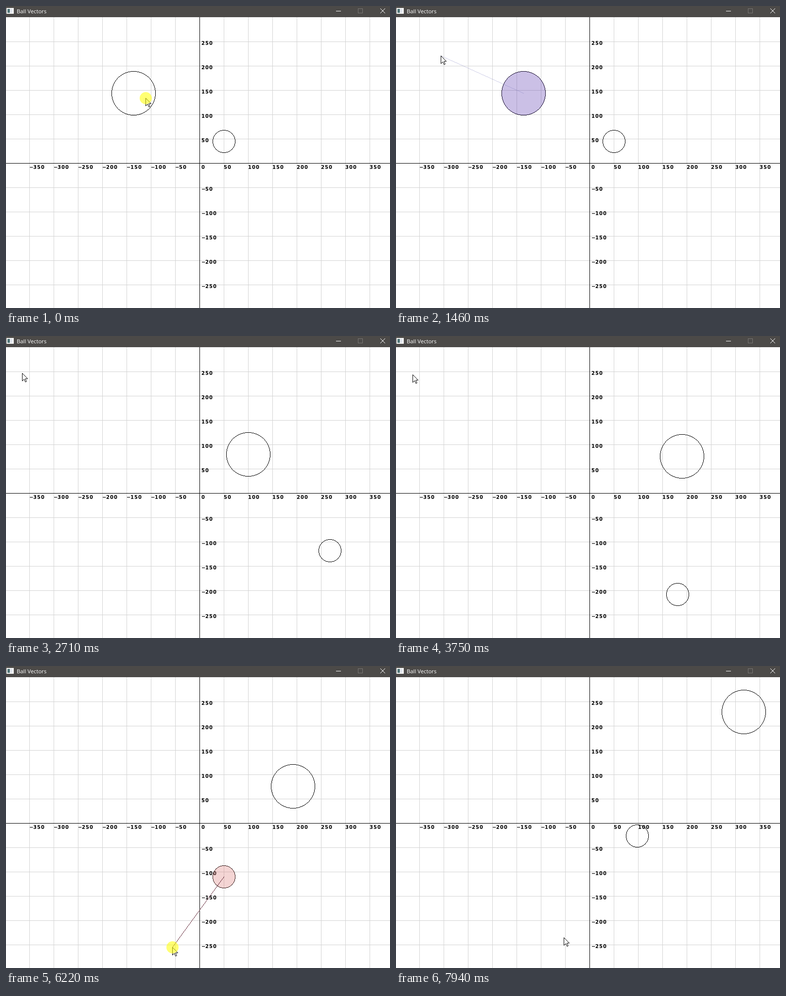
These frames come from a looping animation (790 by 621 pixels, 8000 ms). An HTML page with a canvas:

```html
<!DOCTYPE html>
<html lang="en">
<head>
<meta charset="utf-8">
<title>Ball Vectors</title>
<style>
  html, body { margin: 0; width: 100%; height: 100%; overflow: hidden; background: #fff; }
  canvas { display: block; }
</style>
</head>
<body>
<canvas id="stage" width="790" height="621"></canvas>
<script>
const W = 790, H = 621, BAR = 23, OX = 398, OY = 323, CELL = 50;
const LOOP = 8000, STEP = 69;
const BIG = 45, SMALL = 23, WALL = { x: 765, y: 592 };
const CLICK = 130, LAUNCH_DELAY = 140;
const ctx = document.getElementById('stage').getContext('2d');

const clamp = v => Math.min(1, Math.max(0, v));
const mix = (a, b, p) => a.map((v, i) => v + (b[i] - v) * p);
const progress = (t, from, to) => clamp((t - from) / (to - from));
const smooth = p => p * p * (3 - 2 * p);
const within = (t, from, length) => t >= from && t < from + length;
const fold = (v, limit) => v > limit ? 2 * limit - v : v;

// A shot is aimed between two clicks; the ball then rolls into the other one.
const shots = [
  { press: 0, release: 1800, impact: 2205 },
  { press: 5420, release: 6140, impact: 6620 }
];
for (const shot of shots) shot.launch = shot.release + LAUNCH_DELAY;
const [first, second] = shots;

// Share of the way covered under rolling friction plus drag.
function coast(t, start, stop) {
  const drag = 0.45;
  const left = s => (Math.exp(drag * s) - 1) / drag - s;
  const now = Math.min(stop, Math.max(start, t));
  return 1 - left((stop - now) / 1000) / left((stop - start) / 1000);
}

function bigBall(t) {
  const home = [262, 179], hit = [393, 239], rest = [590, 247], far = [725.6, 81];
  if (t < first.impact) return mix(home, hit, progress(t, first.launch, first.impact));
  if (t < second.impact) return mix(hit, rest, coast(t, first.impact, 3900));
  return mix(rest, far, coast(t, second.impact, 8530));
}

function smallBall(t) {
  const home = [448, 278], rest = [448, 433], hit = [547, 300], end = [496, 349];
  if (t < second.launch) {
    const mirrored = [2 * WALL.x - rest[0], 2 * WALL.y - rest[1]];
    const [x, y] = mix(home, mirrored, coast(t, first.impact, 5380));
    return [fold(x, WALL.x), fold(y, WALL.y)];
  }
  if (t < second.impact) return mix(rest, hit, progress(t, second.launch, second.impact));
  return mix(hit, end, coast(t, second.impact, 7790));
}

// Eased hand movements: each one starts where the last ended.
const moves = [
  { from: 100, to: 650, at: [151, 114] },
  { from: 650, to: 1000, at: [164, 134] },
  { from: 1050, to: 1800, at: [32, 75] },
  { from: 1800, to: 4200, at: [34, 79] },
  { from: 4200, to: 4990, at: [440, 395] },
  { from: 4990, to: 5300, at: [439, 420] },
  { from: 5400, to: 6050, at: [342, 578] },
  { from: 7000, to: 7940, at: [345, 558] }
];
const cursorAt = t => moves.reduce(
  (pos, m) => mix(pos, m.at, smooth(progress(t, m.from, m.to))), [287, 189]);

function rect(color, x, y, w, h) {
  ctx.fillStyle = color;
  ctx.fillRect(x, y, w, h);
}

function ring([x, y], r) {
  ctx.fillStyle = '#000';
  for (let a = 0; a <= r * Math.SQRT1_2 + 0.5; a++) {
    const b = Math.round(Math.sqrt(r * r - a * a));
    for (const sx of [-1, 1]) for (const sy of [-1, 1]) {
      ctx.fillRect(x + sx * a, y + sy * b, 1, 1);
      ctx.fillRect(x + sx * b, y + sy * a, 1, 1);
    }
  }
}

// Centred on the middle of a pixel.
function disc(color, [x, y], r) {
  ctx.fillStyle = color;
  ctx.beginPath();
  ctx.arc(x + 0.5, y + 0.5, r + 0.5, 0, 2 * Math.PI);
  ctx.fill();
}

function pixelLine(color, from, to) {
  const n = Math.max(Math.abs(to[0] - from[0]), Math.abs(to[1] - from[1]));
  ctx.fillStyle = color;
  for (let i = 0; i <= n; i++) {
    const [x, y] = mix(from, to, i / n).map(Math.round);
    ctx.fillRect(x, y, 1, 1);
  }
}

function label(value, x, y) {
  ctx.fillStyle = '#000';
  ctx.font = 'bold 10px "DejaVu Sans", sans-serif';
  ctx.letterSpacing = '1px';
  if (value < 0) {
    ctx.fillText('\u2212', x, y);
    x += 8;
  }
  ctx.fillText(Math.abs(value), x, y);
  ctx.letterSpacing = '0px';
}

function drawGrid() {
  rect('#fff', 0, 0, W, H);
  for (let i = -7; i <= 7; i++) rect('#d3d3d3', OX + i * CELL, BAR, 1, H - BAR);
  for (let i = -5; i <= 5; i++) rect('#d3d3d3', 0, OY + i * CELL, W, 1);
  rect('#000', OX, BAR, 1, H - BAR);
  rect('#000', 0, OY, W, 1);
  for (let i = -7; i <= 7; i++) label(i * CELL, OX + i * CELL + (i ? 0 : 4), OY + 12);
  for (let i = -5; i <= 5; i++) if (i) label(i * CELL, OX + 4, OY - i * CELL + 7);
}

function drawBar() {
  rect('#4c4a48', 0, 0, W, BAR);
  rect('#f4f4f4', 1, 4, 15, 12);
  rect('#4f7476', 3, 6, 5, 8);
  rect('#dfe3ea', 9, 6, 4, 8);
  ctx.fillStyle = '#fff';
  ctx.font = '11.3px "Open Sans", "Noto Sans", sans-serif';
  ctx.fillText('Ball Vectors', 22, 15);
  rect('#fff', 679, 10, 10, 1);
  ctx.strokeStyle = '#797775';
  ctx.strokeRect(724.5, 5.5, 9, 9);
  ctx.strokeStyle = '#fff';
  ctx.stroke(new Path2D('M770 5l10 10m0-10l-10 10'));
}

const arrow = new Path2D('M.5 .5V16.5L4.3 12.9L6.9 18.6L9.2 17.6L6.7 11.9H11.6Z');

function drawCursor(pos, pressed) {
  ctx.save();
  ctx.translate(...pos);
  ctx.fillStyle = '#fff';
  ctx.strokeStyle = '#000';
  ctx.fill(arrow);
  ctx.stroke(arrow);
  ctx.restore();
  if (pressed) disc('rgba(255,255,0,.55)', pos, 12);
}

function drawAim(shot, ball, r, cursor, t) {
  if (!within(t, shot.press + 60, shot.launch - shot.press - 60)) return;
  const tint = mix([5, 5, 205], [218, 118, 112], progress(t, 1040, 2150));
  const faded = mix([80, 80, 220, 0.5], [150, 150, 150, 0.15], progress(t, 1040, 1870));
  disc(`rgba(${tint},.3)`, ball, r);
  pixelLine(shot === first ? `rgba(${faded})` : '#662c3c', ball, cursor);
}

function render(t) {
  const [big, small, cursor] = [bigBall, smallBall, cursorAt].map(f => f(t).map(Math.round));
  drawGrid();
  ring(big, BIG);
  ring(small, SMALL);
  drawAim(first, big, BIG, cursor, t);
  drawAim(second, small, SMALL, cursor, t);
  if (shots.some(s => within(t, s.impact, STEP))) pixelLine('#662c3c', small, big);
  drawBar();
  drawCursor(cursor, shots.some(s => within(t, s.press, CLICK) || within(t, s.release, CLICK)));
}

function tick() {
  const t = performance.now() % LOOP;
  render(Math.floor(t / STEP) * STEP);
  requestAnimationFrame(tick);
}
tick();
</script>
</body>
</html>
```
